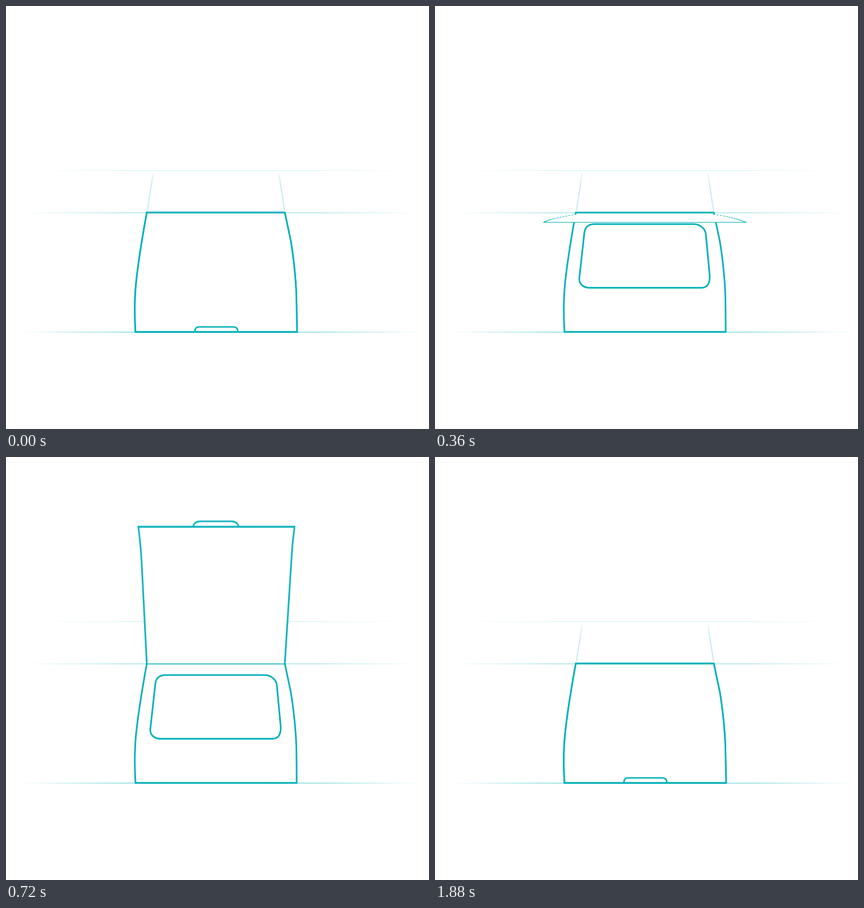
These frames come from a looping animation (748 by 748 pixels, 1.92 s). An HTML page:

```html
<!DOCTYPE html>
<html lang="en">
<head>
<meta charset="utf-8">
<title>Opening box</title>
<style>
  html, body { margin: 0; width: 100%; height: 100%; overflow: hidden; background: #fff; }
  #stage { position: fixed; inset: 0; overflow: hidden; contain: strict; }
  svg { position: absolute; left: 0; top: 0; width: 748px; height: 748px; }
  .ink { fill: #fff; stroke: #04b1b9; stroke-width: 2.9; }
  .handle { fill: none; stroke-width: 2.7; }
</style>
</head>
<body>
<div id="stage">
  <svg viewBox="0 0 748 748">
    <defs>
      <linearGradient id="fade">
        <stop offset="0" stop-color="#04b1b9" stop-opacity="0"/>
        <stop offset=".26" stop-color="#04b1b9"/>
        <stop offset=".74" stop-color="#04b1b9"/>
        <stop offset="1" stop-color="#04b1b9" stop-opacity="0"/>
      </linearGradient>
      <linearGradient id="rise" gradientUnits="userSpaceOnUse" x1="0" y1="294" x2="0" y2="318">
        <stop offset="0" stop-color="#c9eaee" stop-opacity=".3"/>
        <stop offset="1" stop-color="#c9eaee"/>
      </linearGradient>
    </defs>
    <g fill="url(#fade)">
      <rect x="48" y="290" width="664" height="2" opacity=".1"/>
      <rect x="34" y="364.7" width="692" height="2" opacity=".27"/>
      <rect x="26" y="575.7" width="710" height="2" opacity=".38"/>
    </g>
    <path d="M260.3 296L250 362M482.5 296L492.6 362" stroke="url(#rise)" stroke-width="2"/>
    <g class="ink">
      <path d="M249 365.2H493L503.5 415C509 447 513 490 513.5 515Q514 545 514 576.2H229C227 545 227.5 515 230 490C233 460 240 415 249 365.2Z"/>
      <path d="M282 385.6H457C468 385.6 478 393 479 404L485.8 477C486.3 490 482 498.3 471 498.3H273C262 498.3 254.3 491 255.2 481L264 402C265 391 271 385.6 282 385.6Z"/>
    </g>
  </svg>
  <svg id="lid" viewBox="0 0 748 748">
    <g id="front" class="ink">
      <path d="M249 365.2H493L503.5 415C509 447 513 490 513.5 515L514.8 576.2H229C227 545 227.5 515 230 490C233 460 240 415 249 365.2Z"/>
      <path id="closedHandle" class="handle" d="M334 576C334 570 337 567.5 341 567.5H402C407 567.5 410 570 410 576"/>
    </g>
    <g id="back" class="ink">
      <path d="M493 365.2L508 523Q510 550 514.8 576.2H229.3Q234.5 545 236.5 520L249 365.2"/>
      <path class="handle" d="M328.8 576C331 582 336 585 342 585H400C406 585 411 582 413.3 576"/>
    </g>
  </svg>
</div>
<script>
const LOOP = 1920, STEP = 40, SWING = 380, OPEN = 960, SHUT = 1880;
const [lid, front, back, closedHandle] =
  ['lid', 'front', 'back', 'closedHandle'].map(id => document.getElementById(id));
const show = (part, on) => part.style.display = on ? '' : 'none';

function pose(t) {
  if (t < 80 || t >= SHUT) return { angle: 0, stretch: 1, hinge: 365.2 };
  if (t < SWING) return { angle: 31.4 + 0.2775 * (t - 160), stretch: 1, hinge: 368.5 };
  // past upright: quadratic ease-out while the lid lengthens
  const rest = (Math.max(0, OPEN - t) / (OPEN - SWING)) ** 2;
  return { angle: 208.4 - 119 * rest, stretch: Math.max(0.01, 1.46 - 1.54 * rest), hinge: 365.2 };
}

function draw() {
  const t = Math.floor(performance.now() % LOOP / STEP) * STEP;
  const { angle, stretch, hinge } = pose(t);
  lid.style.transformOrigin = `374px ${hinge}px`;
  lid.style.transform = angle
    ? `perspective(1034px) rotateX(${angle}deg) scaleY(${stretch})` : 'none';
  show(front, angle < 90);
  show(back, angle >= 90);
  show(closedHandle, angle === 0);
  requestAnimationFrame(draw);
}
draw();
</script>
</body>
</html>
```
